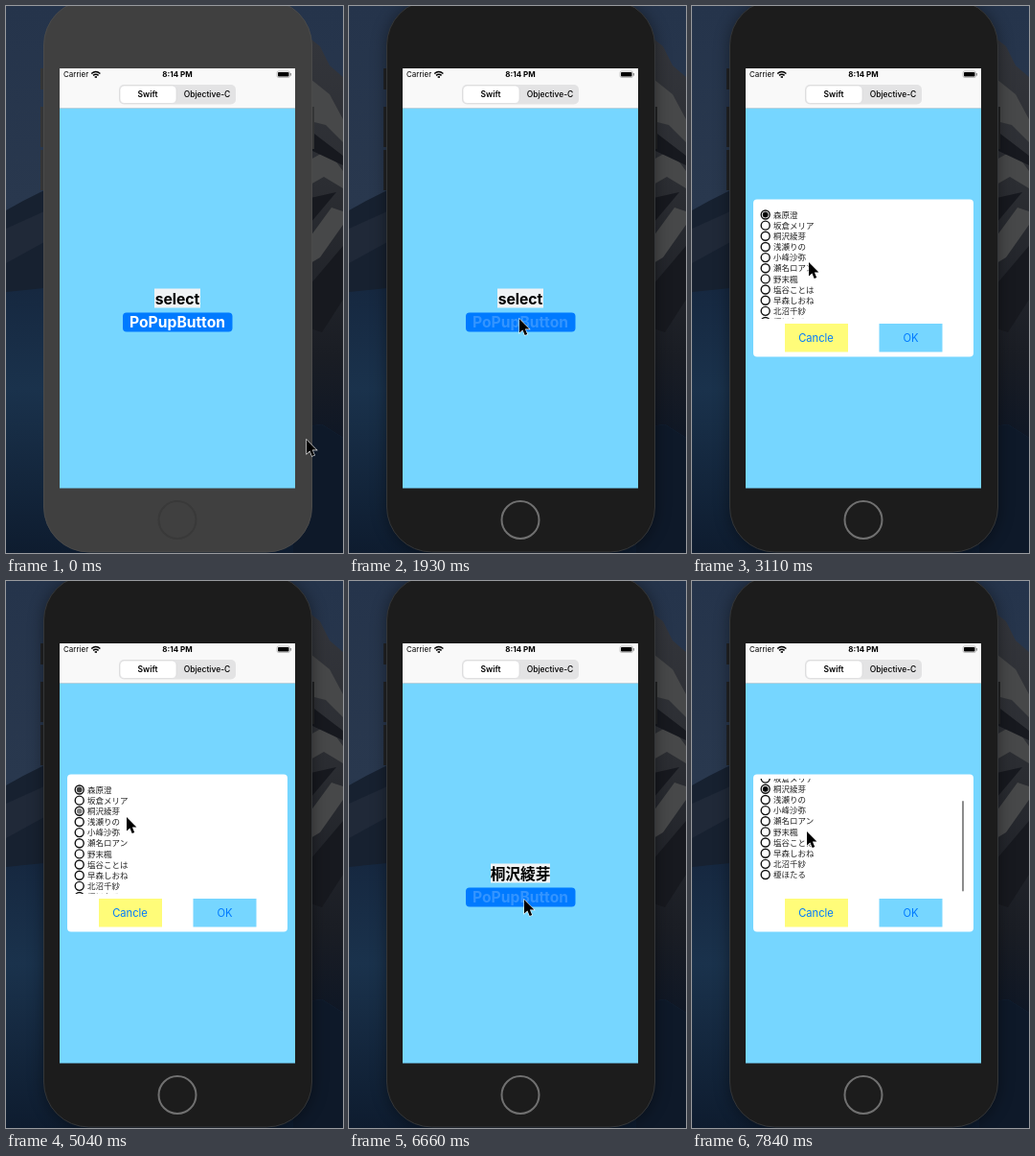
These frames come from a looping animation (352x570 px, 7990 ms). An HTML page:

```html
<!DOCTYPE html>
<html lang="ja">
<head>
<meta charset="utf-8">
<title>Popup button demo</title>
<style>
  html, body { margin: 0; width: 100%; height: 100%; overflow: hidden; background: #16263b; }
  svg { display: block; font-family: Inter, "Noto Sans CJK JP", "Noto Sans CJK", sans-serif; }
  .mid { text-anchor: middle; }
  .bold { font-weight: 700; }
  #device { fill: #404040; stroke: #4a4a4a; }
  #home { fill: none; stroke: #393939; stroke-width: 2; }
  .active #device { fill: #1c1c1c; stroke: #343638; filter: drop-shadow(0 1px 8px rgba(0, 0, 0, .4)); }
  .active #home { stroke: #707070; }
  #keys { fill: #343536; }
  .active #keys { fill: #222325; }
  #rows text { font-size: 8.5px; fill: #222; }
  #rows .ring { fill: #fff; stroke: #111; stroke-width: 1.4; }
</style>
</head>
<body>
<svg id="stage" width="352" height="570" viewBox="0 0 352 570">
  <defs>
    <linearGradient id="sky" x2="0" y2="1">
      <stop offset="0" stop-color="#25344b"/><stop offset=".36" stop-color="#29384e"/>
      <stop offset=".52" stop-color="#162840"/><stop offset=".7" stop-color="#1a324c"/>
      <stop offset="1" stop-color="#0e1c2f"/>
    </linearGradient>
    <linearGradient id="rock" x2="0" y2="1">
      <stop offset="0" stop-color="#34363c"/><stop offset=".4" stop-color="#2b2d32"/>
      <stop offset=".8" stop-color="#1a1d24"/><stop offset="1" stop-color="#0f1725"/>
    </linearGradient>
    <clipPath id="listClip"><rect x="64" y="206" width="230" height="120"/></clipPath>
  </defs>

  <!-- Night coast wallpaper -->
  <rect width="352" height="570" fill="url(#sky)"/>
  <path d="M0 213L18 203L40 192V294L0 298Z" fill="#172130"/>
  <path d="M0 232L40 214V246L0 268Z" fill="#202938"/>
  <path d="M300 20L328 42L338 62L352 74V450L330 436L300 440Z" fill="url(#rock)"/>
  <path d="M318 76L338 92L352 118V142L334 124L318 120ZM318 160L336 150L352 172V190L332 178L318 186ZM318 240L340 210L352 214V228L328 262L318 268Z" fill="#474849"/>
  <path d="M318 130L352 156V166L318 150ZM318 200L345 194L318 226ZM318 290L352 250V306L330 340L318 336Z" fill="#17191f"/>
  <path d="M300 440L330 436L352 450V570H300Z" fill="#0e1929"/>

  <!-- Phone -->
  <path id="keys" d="M36 65h4v22h-4zM36 105h4v42h-4zM36 150h4v42h-4zM319 105h3v44h-3z"/>
  <rect id="device" x="39.5" y="-6" width="280" height="575" rx="47"/>
  <circle id="home" cx="179" cy="535.5" r="19.5"/>
  <rect x="56" y="65" width="246" height="437.5" fill="#76d6ff"/>
  <rect x="56" y="65" width="246" height="41.5" fill="#f9f9f9"/>
  <path d="M56 106.5H302" stroke="#b5c3ca" stroke-width=".6"/>

  <!-- Status bar -->
  <text x="60" y="74" font-size="8">Carrier</text>
  <g fill="none" stroke="#000" stroke-width="1.5">
    <path d="M89.2 70.5Q93.8 66.5 98.4 70.5M91 72.4Q93.8 70 96.6 72.4"/>
    <path d="M92.7 74H95" stroke-width="1.6"/>
  </g>
  <text class="mid bold" x="179" y="74" font-size="8">8:14 PM</text>
  <rect x="283" y="68" width="13.5" height="6.5" rx="1.7" fill="none" stroke="#999" stroke-width=".6"/>
  <rect x="284" y="69" width="11.5" height="4.5" rx=".8"/>
  <path d="M297.5 70v2.6" stroke="#888"/>

  <!-- Segmented control -->
  <rect x="118" y="82" width="122" height="20.5" rx="5" fill="#e3e3e4"/>
  <rect x="119" y="83" width="59" height="18.5" rx="4.5" fill="#fff" stroke="#d3d3d5" stroke-width=".6"/>
  <text class="mid" x="148" y="95" font-size="8.5" font-weight="600">Swift</text>
  <text class="mid" x="210" y="95" font-size="8.5" font-weight="500">Objective-C</text>

  <!-- Label and button -->
  <rect id="labelBox" y="294.5" height="20" fill="#f0f3f5"/>
  <text id="label" class="mid bold" x="179" y="310.5" font-size="15.7"></text>
  <rect x="122" y="319.5" width="114.5" height="20" rx="4" fill="#007aff"/>
  <text id="button" class="mid bold" x="179" y="335.3" font-size="15.7" fill="#fff">PoPupButton</text>

  <!-- Popup -->
  <g id="popup">
    <rect x="64" y="201.5" width="230" height="164" rx="4" fill="#fff"/>
    <g clip-path="url(#listClip)"><g id="rows"></g></g>
    <path id="bar" stroke="#8c8c8c" stroke-width="2" stroke-linecap="round"/>
    <rect x="97" y="331" width="66" height="29.5" fill="#fffc79"/>
    <rect x="195.500" y="331" width="66" height="29.5" fill="#76d6ff"/>
    <g class="mid" font-size="11.2" fill="#007aff">
      <text x="129.500" y="350">Cancle</text>
      <text id="ok" x="228.500" y="350">OK</text>
    </g>
  </g>

  <path id="cursor" d="M0 0V14.600L3.400 11.500L5.700 17L8.200 16L5.900 10.600H10.400Z"
        stroke="#fff" stroke-width="1.1" paint-order="stroke"/>
</svg>
<script>
const LOOP = 7990, TICK = 148, ROW = 11.15;
const names = ["森原澄", "坂倉メリア", "桐沢綾芽", "浅瀬りの", "小峰沙弥", "瀬名ロアン",
  "野末楓", "塩谷ことは", "早森しおね", "北沼千紗", "榎ほたる"];

// Pointer path: [tick, x, y]
const path = [
  [0, 314, 452], [1, 313, 457], [3, 289, 449], [8, 174, 389], [11, 176, 336], [13, 178, 326], [16, 178, 326],
  [17, 176, 335], [21, 122, 267], [24, 94, 236], [27, 88, 238], [30, 88, 238], [31, 87, 239], [33, 87, 239],
  [34, 126, 246], [37, 210, 330], [38, 222, 343], [39, 220, 342], [41, 220, 342], [42, 200, 336],
  [43, 183, 332], [46, 183, 332], [47, 176, 338], [48, 176, 338], [49, 139, 319], [53, 120, 261]
];

const $ = id => document.getElementById(id);
const set = (id, attrs) => { for (const k in attrs) $(id).setAttribute(k, attrs[k]); };

$("rows").innerHTML = names.map((name, i) => {
  const y = 217.5 + i * ROW;
  return `<circle class="ring" cx="76.700" cy="${y}" r="4.500"/>
    <circle class="dot" cx="76.700" cy="${y}" r="2.900"/>
    <text x="85" y="${y + 3.1}">${name}</text>`;
}).join("");
const dots = document.querySelectorAll(".dot");

function pointer(tick) {
  const i = path.findIndex(key => key[0] >= tick);
  if (i < 1) return path[0].slice(1);
  const [t0, x0, y0] = path[i - 1], [t1, x1, y1] = path[i];
  const p = (tick - t0) / (t1 - t0);
  return [x0 + (x1 - x0) * p, y0 + (y1 - y0) * p];
}

function render(time) {
  const tick = Math.min(53, Math.floor((time % LOOP + 5) / TICK));
  const chosen = tick >= 39;
  const open = (tick >= 14 && tick < 39) || tick >= 46;
  const pressed = tick === 13 || tick === 45;
  const drag = Math.max(0, (tick - 49) / 4);

  $("stage").classList.toggle("active", tick >= 11);
  $("label").textContent = chosen ? names[2] : "select";
  set("labelBox", chosen ? { x: 148, width: 62 } : { x: 155, width: 48 });
  set("button", { "fill-opacity": pressed ? 0.2 : 1 });
  set("popup", { visibility: open ? "visible" : "hidden" });
  set("ok", { "fill-opacity": tick === 38 ? 0.2 : 1 });
  set("rows", { transform: `translate(0 ${-23 * drag})` });
  set("bar", { d: `M283 ${210 + 20 * drag}V322.500`, opacity: drag ? 1 : 0 });
  dots.forEach((dot, i) => {
    const first = tick < 34 ? 1 : tick === 34 ? 0.75 : 0;
    const third = tick < 34 ? 0 : tick === 34 ? 0.5 : 1;
    dot.setAttribute("opacity", i === 0 ? first : i === 2 ? third : 0);
  });
  set("cursor", { transform: `translate(${pointer(tick)})` });
}

function loop() {
  render(performance.now());
  requestAnimationFrame(loop);
}
loop();
</script>
</body>
</html>
```
